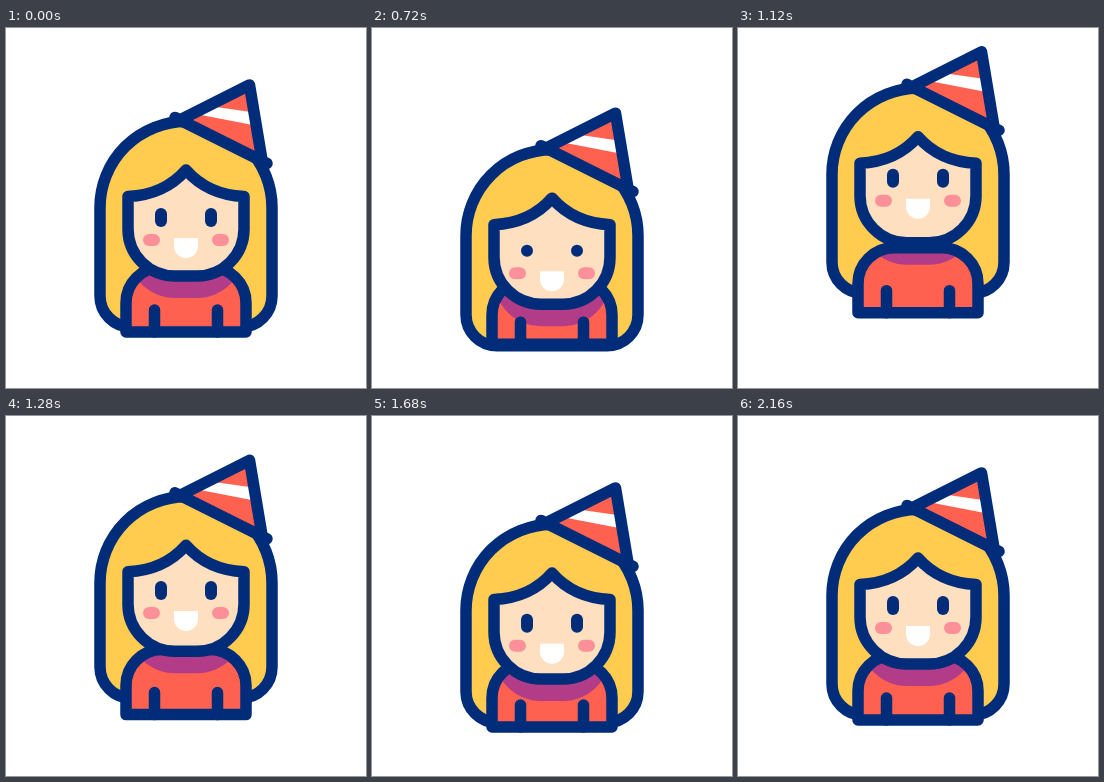
An HTML page that plays this animation: 360x360 px, repeating every 2400 ms.

```html
<!DOCTYPE html>
<html lang="en">
<head>
<meta charset="utf-8">
<title>Party girl</title>
<style>
html, body { margin: 0; width: 100%; height: 100%; overflow: hidden; background: #fff; }
svg { display: block; width: 100vw; height: 100vh; }
.line { stroke: #002c7a; stroke-width: 11.5; stroke-linecap: round; stroke-linejoin: round; }
</style>
</head>
<body>
<svg viewBox="0 0 360 360">
  <defs>
    <path id="torso" d="M120 304V275A36 36 0 0 1 156 239H204A36 36 0 0 1 240 275V304Z"/>
    <path id="face" d="M122 168.5Q158 167 180 142Q202 167 238 168.5V201A47 47 0 0 1 191 248H169A47 47 0 0 1 122 201Z"/>
    <clipPath id="inTorso"><use href="#torso"/></clipPath>
  </defs>
  <path id="hair" class="line" fill="#ffcc4f"/>
  <g id="body">
    <use href="#torso" fill="#ff6150"/>
    <g clip-path="url(#inTorso)"><use id="shadow" href="#face" fill="#b23c87"/></g>
    <use href="#torso" class="line" fill="none"/>
    <path class="line" d="M148.5 282V304M211.5 282V304"/>
  </g>
  <g id="head">
    <use href="#face" class="line" fill="#fee0c0"/>
    <path fill="#ff6150" d="M244 57L257 133L174 92Z"/>
    <path fill="#fff" d="M190 86L203 78L245 84L247 97Z"/>
    <path class="line" fill="none" d="M169 89.5L261 135.5M174 92L243.5 57L256 132"/>
  </g>
  <g id="features">
    <g fill="#fc9099">
      <rect x="137" y="206" width="17" height="12" rx="6"/>
      <rect x="206" y="206" width="17" height="12" rx="6"/>
    </g>
    <path fill="#fff" d="M168 210H192V218A12 12 0 0 1 168 218Z"/>
    <g fill="#002c7a">
      <rect class="eye" x="149" width="12" rx="6"/>
      <rect class="eye" x="199" width="12" rx="6"/>
    </g>
  </g>
</svg>
<script>
const LOOP = 2400, STEP = 40;

// Moments of rest, crouch, leap, landing and rest; the head trails the body.
const bodyTimes = [240, 560, 1080, 1520, 1840];
const headTimes = [240, 640, 1100, 1520, 2000];

// Ease from pose to pose.
function swing(t, times, poses) {
  const i = times.findIndex(time => time > t);
  if (i < 1) return 0;
  const u = (t - times[i - 1]) / (times[i] - times[i - 1]);
  return poses[i - 1] + (poses[i] - poses[i - 1]) * (1 - Math.cos(Math.PI * u)) / 2;
}

// Eye opening, 0 to 1, with two blinks.
const openness = t => Math.min(1, Math.abs(t - 720) / 80, Math.abs(t - 1840) / 80);

const el = id => document.getElementById(id);
const move = (id, y) => el(id).setAttribute("transform", `translate(0 ${y})`);

function draw(now) {
  const t = Math.floor(now % LOOP / STEP) * STEP;
  const head = swing(t, headTimes, [0, 33, -33.5, 20, 0]);
  const body = swing(t, bodyTimes, [0, 21, -20, 14, 0]);
  const top = 179.5 + head;
  const end = 299 + swing(t, headTimes, [0, 23, -34, 10, 0]);

  move("head", head);
  move("body", body);
  move("shadow", head - body + 22);
  move("features", head * 1.18);
  el("hair").setAttribute("d",
    `M94 ${top}A86 86 0 0 1 266 ${top}V${end - 31}` +
    `A31 31 0 0 1 235 ${end}H125A31 31 0 0 1 94 ${end - 31}Z`);

  const height = 12 + 7 * openness(t);
  for (const eye of document.querySelectorAll(".eye")) {
    eye.setAttribute("height", height);
    eye.setAttribute("y", 189.5 - height / 2);
  }
}

const start = performance.now();
function tick() {
  draw(performance.now() - start);
  requestAnimationFrame(tick);
}
tick();
</script>
</body>
</html>
```
